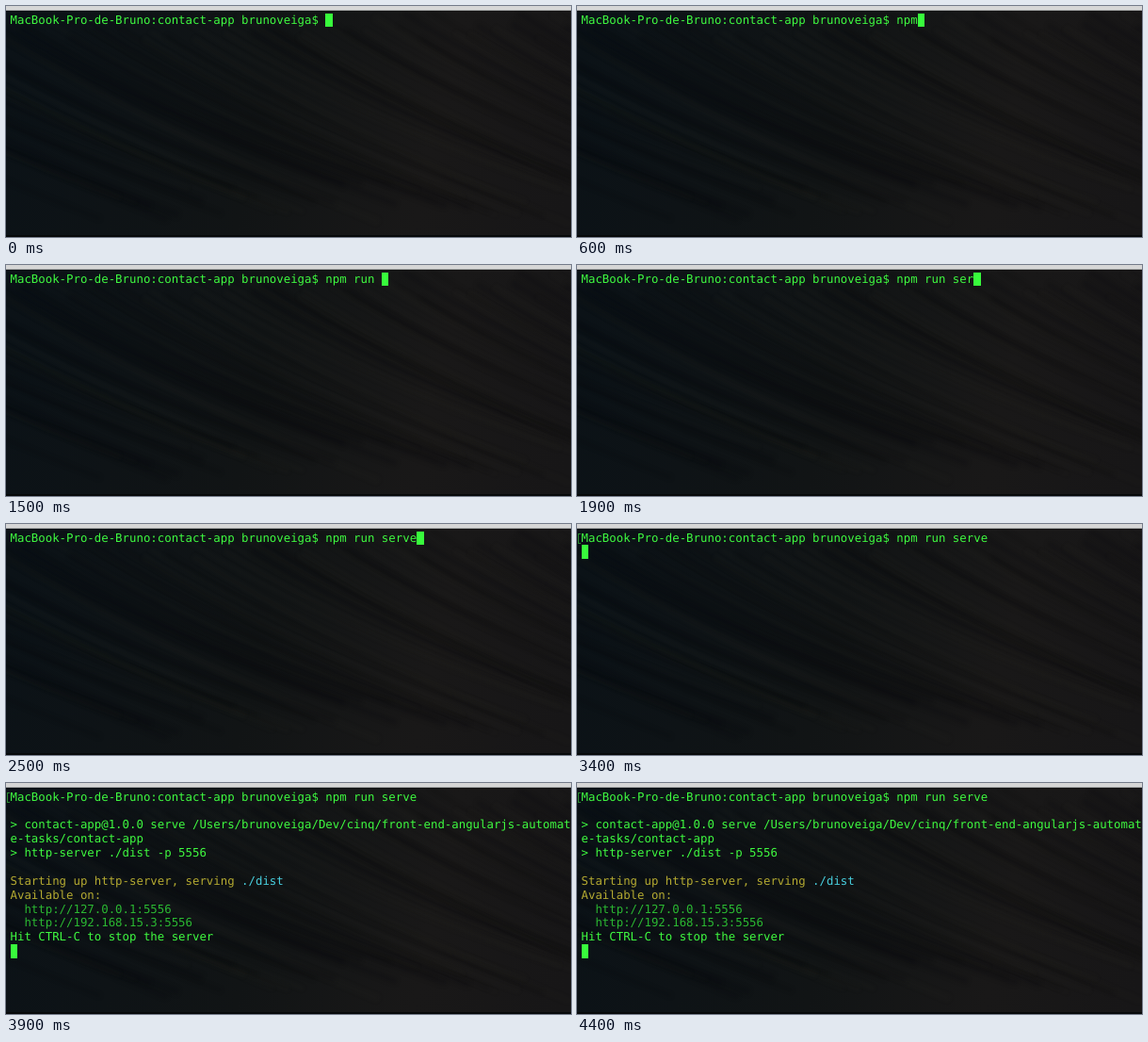
An HTML page with a canvas for the animation above (4500 ms loop, 600 by 245 pixels).

```html
<!DOCTYPE html>
<html lang="en">
<head>
<meta charset="utf-8">
<title>Terminal</title>
<style>
  html, body { margin: 0; width: 600px; height: 245px; overflow: hidden; background: #0c1115; }
  canvas { position: absolute; left: 0; top: 0; }
  pre, #cursor, #mark { position: absolute; margin: 0; }
  pre {
    left: 4.5px; top: 7.5px; color: #3ffa40;
    font: 12.36px/14.88px "DejaVu Sans Mono", "Noto Sans Mono", monospace;
    text-rendering: geometricPrecision; font-variant-ligatures: none;
  }
  #cursor { width: 7.5px; height: 14.7px; background: #38fb3c; }
  #mark {
    left: 1px; top: 10px; width: 2px; height: 9px;
    border: solid #2a8a30; border-width: 1px 0 1px 1px;
  }
  .warn { color: #b4aa31; }
  .path { color: #48cfdf; }
  .url { color: #2bb832; }
</style>
</head>
<body>
<canvas width="600" height="245"></canvas>
<pre id="text"></pre>
<div id="mark"></div>
<div id="cursor"></div>
<script>
const LOOP = 4500, CELL = 7.44, ROW = 14.88;
const ENTER = 2600, RUN = 3600, READY = 3900;
const prompt = "MacBook-Pro-de-Bruno:contact-app brunoveiga$ ";
const command = "npm run serve";
const keyTimes = [100, 400, 600, 800, 1000, 1100, 1200, 1400, 1600, 1800, 1900, 2000, 2300];

const header = `

&gt; contact-app@1.0.0 serve /Users/brunoveiga/Dev/cinq/front-end-angularjs-automat
e-tasks/contact-app
&gt; http-server ./dist -p 5556
`;
const status = `
<span class="warn">Starting up http-server, serving </span><span class="path">./dist</span>
<span class="warn">Available on:</span>
<span class="url">  http://127.0.0.1:5556
  http://192.168.15.3:5556</span>
Hit CTRL-C to stop the server`;

const [text, mark, cursor] = ["text", "mark", "cursor"].map(id => document.getElementById(id));

function drawBackdrop() {
  const c = document.querySelector("canvas").getContext("2d");
  const fill = (style, y, h) => { c.fillStyle = style; c.fillRect(0, y, 600, h); };
  const base = c.createLinearGradient(0, 60, 600, 190);
  base.addColorStop(0, "#0b1217");
  base.addColorStop(0.45, "#111415");
  base.addColorStop(0.75, "#191818");
  base.addColorStop(1, "#171617");
  fill(base, 0, 245);

  let seed = 7;
  const random = () => (seed = seed * 16807 % 2147483647) / 2147483647;
  c.filter = "blur(2px)";
  // Soft streaks sweeping down to the right
  for (let i = 0; i < 60; i++) {
    const x = -300 + i * 15 + random() * 12, y = 5 + random() * 30;
    c.strokeStyle = random() < 0.6 ? "rgba(0,4,8,.16)" : "rgba(60,54,50,.07)";
    c.lineWidth = 2 + random() * 6;
    c.beginPath();
    c.moveTo(x, y);
    c.quadraticCurveTo(x + 150, y + 95, x + 400, y + 175 + random() * 25);
    c.stroke();
  }
  c.filter = "none";
  fill("#d6d6d6", 0, 4);
  fill("#a9abab", 4, 1);
  fill("#07090a", 243, 2);
}

let shown = "";
function draw(now) {
  const t = now % LOOP;
  const typed = keyTimes.filter(k => k <= t).length;
  const entered = t >= ENTER;
  const line = prompt + command.slice(0, typed);
  const html = line + (t >= RUN ? header : "") + (t >= READY ? status : "");
  if (html !== shown) text.innerHTML = shown = html;

  const row = t >= READY ? 11 : t >= RUN ? 6 : entered ? 1 : 0;
  const col = entered ? 0 : line.length;
  cursor.style.left = 4.5 + col * CELL + "px";
  cursor.style.top = 7.5 + row * ROW + "px";
  mark.hidden = !entered;
}

const start = performance.now();
function tick() {
  draw(performance.now() - start);
  requestAnimationFrame(tick);
}
drawBackdrop();
tick();
</script>
</body>
</html>
```
